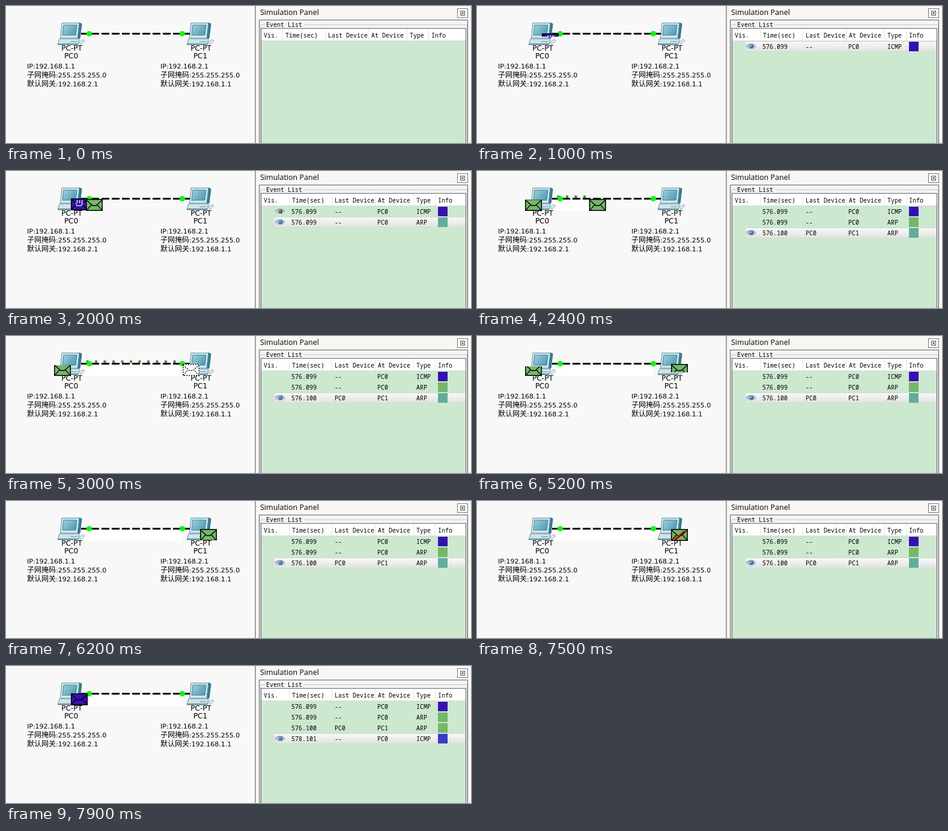
An HTML page with a canvas for the animation above (8 s loop, 774 by 230 pixels).

```html
<!DOCTYPE html>
<html lang="en">
<head>
<meta charset="utf-8">
<title>Packet simulation</title>
<style>
html, body { margin: 0; width: 774px; height: 230px; overflow: hidden; }
canvas { display: block; }
</style>
</head>
<body>
<canvas id="stage" width="774" height="230"></canvas>
<script>
const LOOP = 8000, TICK = 100;
const GREEN = '#74b868', BLUE = '#3710b4', TEAL = '#5fae98';
const MONO = '10px "Noto Sans Mono", monospace';
const SANS = '"DejaVu Sans", sans-serif';
const c = document.getElementById('stage').getContext('2d');
const clamp = v => Math.max(0, Math.min(1, v));
const ramp = (t, from, to) => clamp((t - from) / (to - from));

function rect(x, y, w, h, fill) {
  c.fillStyle = fill;
  c.fillRect(x, y, w, h);
}

function text(s, x, y, font, fill = '#000', align = 'left') {
  c.font = font;
  c.fillStyle = fill;
  c.textAlign = align;
  c.fillText(s, x, y);
}

function path(points, stroke, width = 1, fill) {
  c.beginPath();
  points.forEach(([x, y]) => c.lineTo(x, y));
  if (fill) { c.closePath(); c.fillStyle = fill; c.fill(); }
  if (stroke) { c.strokeStyle = stroke; c.lineWidth = width; c.stroke(); }
}

function dot(x, y, r, fill) {
  c.beginPath();
  c.arc(x, y, r, 0, 7);
  c.fillStyle = fill;
  c.fill();
}

// Draws only the rows between top and bottom.
function rows(top, bottom, draw) {
  if (bottom <= top) return;
  c.save();
  c.beginPath();
  c.rect(0, top, 774, bottom - top);
  c.clip();
  draw();
  c.restore();
}

function envelope(x, y, fill, dashed) {
  c.save();
  c.translate(x, y);
  rect(0, 0, 28, 20, fill);
  if (dashed) c.setLineDash([2, 2]);
  c.strokeStyle = '#000';
  c.lineWidth = 1.5;
  c.strokeRect(.75, .75, 26.5, 18.5);
  path([[1, 2], [11, 11], [17, 11], [27, 2]], '#000', 1.4);
  path([[1, 19], [9, 10]], '#000', 1.2);
  path([[27, 19], [19, 10]], '#000', 1.2);
  c.restore();
}

function computer(dx, name) {
  c.save();
  c.translate(dx, 0);
  const glass = c.createLinearGradient(95, 32, 117, 50);
  glass.addColorStop(0, '#9fd0de');
  glass.addColorStop(1, '#4797ae');
  path([[122, 60], [129, 56], [131, 59], [124, 65]], '#8fb0ba', 1, '#dcebef');
  path([[89, 55], [122, 55], [120, 65], [86, 65]], '#6595a4', 1, '#cfe3e9');
  path([[87, 64], [120, 64]], '#3f7688', 1.5);
  path([[107, 60], [118, 60]], '#5d93a4');
  path([[122, 28], [126, 30], [123, 54], [119, 54]], '#2d6c7f', 1, '#347c92');
  path([[93, 28.5], [122, 28.5], [119, 54], [90.5, 54]], '#5d93a4', 1, '#d3e7ed');
  path([[96, 32], [118, 32], [116, 49], [94, 49]], '#3d8098', 1, glass);
  text('PC-PT', 109.5, 75, '12px ' + SANS, '#000', 'center');
  text(name, 108.5, 88, '12px ' + SANS, '#000', 'center');
  c.restore();
}

function addresses(x, own, gateway) {
  const lines = [['', 'IP:' + own], ['子网掩码', ':255.255.255.0'], ['默认网关', ':' + gateway]];
  lines.forEach(([label, value], i) => {
    const y = 105 + i * 15;
    text(label, x, y, '300 12px "Noto Sans CJK SC", "Noto Sans CJK", sans-serif');
    text(value, x + label.length * 12, y, '11px ' + SANS);
  });
}

function link(t) {
  const sent = 133 + 161 * ramp(t, 2100, 3000);
  if (t >= 2100) rect(127, 50, sent - 127, 17, '#fff');
  c.setLineDash([13, 4]);
  path([[125, 46.5], [306, 46.5]], '#000', 3);
  c.setLineDash([]);
  if (t >= 2100 && t < 4200) {
    const cleared = 119 + 181 * ramp(t, 3100, 4200);
    for (let x = 119; x < Math.min(sent, 292); x += 14.5)
      if (x >= cleared || t < 3100) rect(x, 41, 4, 4, '#4c8a40');
  }
  dot(138.5, 46.5, 4.6, '#0f0');
  dot(293.5, 46.5, 4.6, '#0f0');
}

function packets(t) {
  if (t >= 1000 && t < 2100) {
    rows(46, 46 + 21 * ramp(t, 900, 1300), () => {
      envelope(108, 46, BLUE);
      [118.5, 122.5, 126.5].forEach(x => path([[x, 49], [x, 54]], '#e4e2f8', 1.6));
      path([[116, 54], [118, 58], [125, 58], [128, 54]], '#e4e2f8', 1.4);
    });
    if (t >= 1300) envelope(108 + 25 * ramp(t, 1300, 1800), 47, GREEN);
  }
  if (t >= 2100 && t < 5400)
    rows(48 + Math.floor(3 * ramp(t, 2700, 3600)), 67, () => envelope(80, 47, GREEN));
  if (t >= 2100 && t < 3000) envelope(133 + 161 * ramp(t, 2100, 3000), 47, GREEN);
  if (t >= 3000 && t < 3300) envelope(294, 47, '#fff', true);
  if (t >= 3300 && t < 7600) {
    const edge = t < 4300 ? 47 + (t - 3300) / 100 : 57 + Math.floor((t - 4270) / 210);
    rows(47, Math.min(67, edge), () => envelope(323, 47, GREEN));
    const p = ramp(t, 6400, 7200);
    if (p) {
      const end = [345 - 17 * p, 50 + 15 * p];
      path([[346, 51], [end[0] + 1, end[1] + 1]], '#301008', 3);
      path([[345, 50], end], '#e82010', 2);
      if (p > .6) path([[329, 58], [334, 64]], '#e82010', 1.5);
    }
  }
  if (t >= 7600) rows(46, 46 + 7 * ((t - 7500) / 100), () => envelope(108, 46, BLUE));
}

function eye(x, y, iris) {
  c.beginPath();
  c.ellipse(x, y, 8, 4.5, 0, 0, 7);
  c.fillStyle = iris === '#555' ? '#c6cac6' : '#a9c4dc';
  c.fill();
  path([[x - 8, y - 1], [x - 3, y - 4], [x + 4, y - 4], [x + 8, y]], '#7d8a94');
  dot(x + 1, y, 3.3, iris);
  dot(x, y - 1, 1, '#e8eef4');
}

function eventRow(i, cells, color, selected, seen) {
  const top = 60 + i * 18;
  if (selected) {
    const g = c.createLinearGradient(0, top, 0, top + 17);
    g.addColorStop(0, '#f8f8f8');
    g.addColorStop(1, '#dfe1df');
    c.beginPath();
    c.roundRect(446.5, top - .5, 318, 17, 3);
    c.fillStyle = g;
    c.fill();
    c.strokeStyle = '#d5d9d5';
    c.lineWidth = 1;
    c.stroke();
  }
  if (seen) eye(456, top + 8, selected ? '#416f9c' : '#555');
  [475, 547, 618, 683].forEach((x, k) => text(cells[k], x, top + 12, MONO));
  rect(719, top, 16, 16, color);
}

function panel(t) {
  rect(414, 0, 360, 230, '#f8f7f3');
  rect(414, 0, 2, 230, '#a0a0a0');
  text('Simulation Panel', 423, 15, '12.5px "Open Sans", sans-serif');
  c.lineWidth = 1;
  c.strokeStyle = '#777';
  rect(751, 4, 17, 15, '#fff');
  c.strokeRect(751.5, 4.5, 17, 15);
  c.strokeStyle = '#555';
  c.strokeRect(756.5, 8.5, 7, 7);
  path([[758, 10], [762, 14]], '#333');
  path([[762, 10], [758, 14]], '#333');

  rect(421, 23, 348, 207, '#606060');
  rect(422, 24, 346, 206, '#f4f4f4');
  path([[432, 31.5], [423.5, 31.5], [423.5, 230]], '#c8c8c8');
  path([[496, 31.5], [767.5, 31.5], [767.5, 230]], '#c8c8c8');
  text('Event List', 433, 35, MONO);
  rect(424, 37, 342, 193, '#60656c');
  rect(425, 38, 340, 192, '#cce8cf');
  rect(425, 38, 340, 20, '#fff');

  const shift = t < 1000 ? 0 : 11;
  ['Vis.', 'Time(sec)', 'Last Device', 'At Device', 'Type', 'Info'].forEach((s, i) => {
    const x = [429, 465, 536, 608, 672, 708][i] + (i ? shift : 0);
    text(s, x, 53, MONO);
    if (i) rect(x - 5, 38, 1, 20, '#e0e3e6');
  });
  rect(425, 58, 340, 1, '#d5dad5');

  const early = t < 2100, late = t >= 7600;
  if (t >= 1000) eventRow(0, ['576.099', '--', 'PC0', 'ICMP'], BLUE, t < 1300, early);
  if (t >= 1300) eventRow(1, ['576.099', '--', 'PC0', 'ARP'], early ? TEAL : GREEN, early, early);
  if (!early) eventRow(2, ['576.100', 'PC0', 'PC1', 'ARP'], late ? GREEN : TEAL, !late, !late);
  if (late) eventRow(3, ['578.101', '--', 'PC0', 'ICMP'], '#3a38ce', true, true);
}

function draw(now) {
  const t = Math.floor(now % LOOP / TICK) * TICK;
  rect(0, 0, 774, 230, '#f8f8f8');
  link(t);
  computer(0, 'PC0');
  computer(215, 'PC1');
  addresses(35, '192.168.1.1', '192.168.2.1');
  addresses(257, '192.168.2.1', '192.168.1.1');
  packets(t);
  panel(t);
  requestAnimationFrame(draw);
}
requestAnimationFrame(draw);
</script>
</body>
</html>
```
